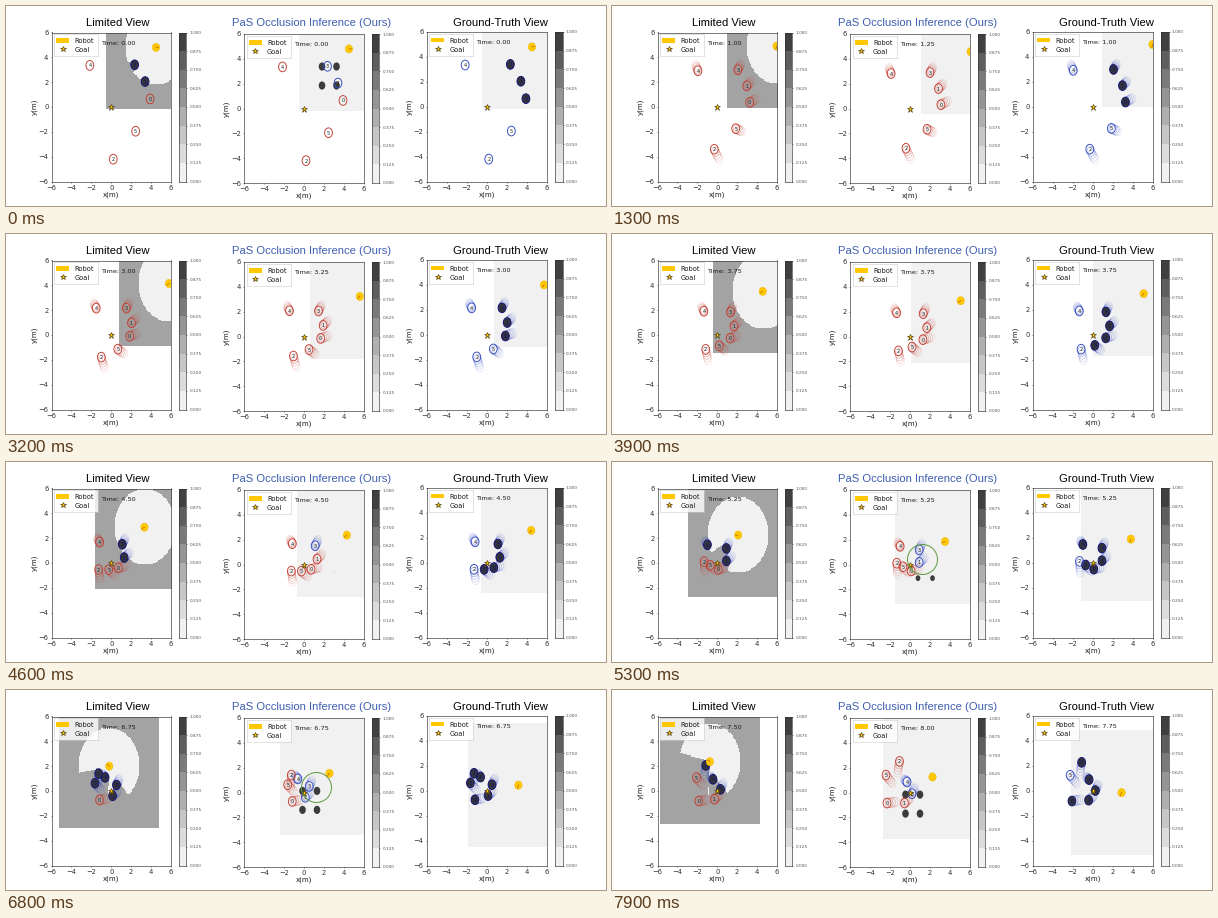
A matplotlib script for the animation above (8 s loop, 600 by 200 pixels).

```python
from itertools import product

import numpy as np
import matplotlib.pyplot as plt
from matplotlib.animation import FuncAnimation
from matplotlib.patches import Circle, Ellipse, Rectangle

W, H, DPI = 600, 200, 100
FRAMES, INTERVAL = 80, 100
PT = 72 / DPI
DT = 0.25            # simulation step
END = 8              # simulated seconds
TRAIL = 4            # past poses shown
RADIUS = 0.39        # pedestrian
RANGE = 3.05         # sensor reach
HALF = 5             # half side of the local map

RED, BLUE, NAVY = "#c23a2e", "#2f46c0", "#10107c"
GOLD, DARK, INK = "#ffc800", "#33333a", "#303030"
LIGHT, GREY = 0.945, 0.64

# Start, middle and end of each crossing.
PEDS = {
    "4": [(-2.15, 3.35), (-1.28, 1.83), (-.3, .85)],
    "3": [(2.35, 3.4), (1.25, 1.73), (.2, -.1)],
    "1": [(3.4, 2.05), (1.55, .62), (-.55, -.85)],
    "0": [(3.9, .65), (1.1, -.3), (-2.3, -.85)],
    "5": [(2.45, -1.95), (.05, -.75), (-2.4, 1.4)],
    "2": [(.2, -4.2), (-1.2, -.95), (-1.05, 2.5)],
}
ROBOT_T = [0, 1, 3, 5.25, 6.75, END]
BLOB_DX, BLOB_DY = (-2.7, -1.25), (-1.42, -2.95)

plt.rcParams.update({"font.family": "DejaVu Sans", "axes.linewidth": 0.45,
                     "text.color": "#1a1a1a", "xtick.color": INK,
                     "ytick.color": INK, "axes.edgecolor": INK})
fig = plt.figure(figsize=(W / DPI, H / DPI), dpi=DPI, facecolor="white")


def axes_px(left, top, width, height):
    return fig.add_axes([left / W, 1 - (top + height) / H, width / W, height / H])


def text_px(x, y, s, size, **kw):
    kw = {"ha": "center", "va": "center", **kw}
    return fig.text(x / W, 1 - y / H, s, fontsize=size * PT, **kw)


def crossing(points, t):
    """Parabola through three evenly timed points."""
    a, b, c = np.asarray(points)
    u = 2 * t / END - 1
    return b + u * (c - a) / 2 + u * u * ((a + c) / 2 - b)


def ped_positions(t):
    return [crossing(p, t) for p in PEDS.values()]


def blob_size(t, onset):
    """Fades out early on and grows back after the onset."""
    return np.clip(max(3 - 4 * t, (t - onset) / 1.2), 0, 1)


def polar(vec):
    return np.hypot(*vec), np.arctan2(vec[1], vec[0])


def angle_gap(a, b):
    return np.abs((a - b + np.pi) % (2 * np.pi) - np.pi)


def half_angle(dist):
    return np.arcsin(min(1, RADIUS / max(dist, RADIUS)))


def seen_by(robot, peds):
    """Which pedestrians are in reach and not hidden behind a nearer one."""
    rel = [polar(p - robot) for p in peds]
    return [d < RANGE + 0.25 and not any(
        e < d and angle_gap(a, b) < 0.55 * half_angle(e) for e, b in rel)
        for d, a in rel]


CELLS = (np.arange(100) + 0.5) / 10 - HALF
GX, GY = np.meshgrid(CELLS, CELLS)
GDIST, GANG = np.hypot(GX, GY), np.arctan2(GY, GX)


def visible_map(robot, peds):
    free = GDIST < RANGE
    for p in peds:
        d, a = polar(p - robot)
        if d < RANGE + RADIUS:
            free &= ~((angle_gap(GANG, a) < half_angle(d)) & (GDIST > d))
    return free


class Panel:
    def __init__(self, box, mode, title, start, step, last, route):
        left, top, width, height = box
        self.mode, self.start, self.step, self.last = mode, start, step, last
        self.route = np.asarray(route)

        ax = self.ax = axes_px(*box)
        ax.set(xlim=(-6, 6), ylim=(-6, 6), autoscale_on=False,
               xticks=range(-6, 7, 2), yticks=range(-6, 7, 2))
        ax.tick_params(labelsize=6.8 * PT, length=1, width=0.4, pad=1.2)
        text_px(left + width / 2, top + height + 12.8, "x(m)", 7)
        text_px(left - 17, top + height / 2, "y(m)", 7, rotation=90)
        text_px(*title[:2], title[2], 11.3, color=title[3], family="Liberation Sans")
        self.colorbar(left + width + 7.5, top, height)
        self.legend(left, top)
        self.clock = text_px(left + 49.7, top + 10.6, "", 6.5, ha="left")

        if mode == "limited":
            self.local = ax.imshow(np.zeros((100, 100)), cmap="gray", vmin=0, vmax=1,
                                   origin="lower", interpolation="nearest",
                                   aspect="auto", zorder=1)
        else:
            self.local = ax.add_patch(Rectangle((0, 0), 2 * HALF, 2 * HALF,
                                                fc=str(LIGHT), zorder=1))
        ax.plot(0, 0, "*", ms=4.6, mfc=GOLD, mec="#4a3a10", mew=0.45, zorder=7)

        self.trails = [[self.ring(0.42 - 0.09 * k, 0.5, 3) for k in range(TRAIL)]
                       for _ in PEDS]
        self.rings = [self.ring(1, 0.65, 5) for _ in PEDS]
        self.tags = [ax.text(0, 0, n, fontsize=5 * PT, ha="center",
                             va="center_baseline", zorder=6, clip_on=True)
                     for n in PEDS]
        self.blobs = [ax.add_patch(Ellipse((0, 0), 0, 0, fc="#3c3c3c", zorder=4))
                      for _ in range(4)] if mode == "inferred" else []
        self.robot = ax.add_patch(Ellipse((0, 0), 0.74, 0.66, fc=GOLD,
                                          ec="#eab000", lw=0.3, zorder=8))
        self.nose, = ax.plot([], [], color="#c07000", lw=0.6, zorder=9)

    def ring(self, alpha, lw, z):
        return self.ax.add_patch(Ellipse((0, 0), 2 * RADIUS, 2 * RADIUS,
                                         fc="none", lw=lw, alpha=alpha, zorder=z))

    def colorbar(self, x, top, height):
        bar = axes_px(x, top, 8, height)
        marks = np.arange(9) / 8
        for v in marks[:-1]:
            shade = LIGHT - 0.62 * v - 0.2 * v * v
            bar.add_patch(Rectangle((0, v), 1, 1 / 8, fc=str(shade), lw=0))
        bar.set(xlim=(0, 1), ylim=(0, 1), xticks=[], yticks=marks,
                yticklabels=[f"{v:.3f}" for v in marks])
        bar.yaxis.tick_right()
        bar.tick_params(labelsize=4.3 * PT, length=1, width=0.4, pad=1.2,
                        labelcolor="#555555")

    def legend(self, left, top):
        box = axes_px(left + 2.5, top + 1.5, 44, 22)
        box.set(xlim=(0, 44), ylim=(22, 0), xticks=[], yticks=[])
        box.patch.set_alpha(0.8)
        for side in box.spines.values():
            side.set(color="#cccccc", linewidth=0.4)
        box.add_patch(Rectangle((2.3, 4.2), 13, 4.8, fc=GOLD))
        box.plot(8.8, 15.4, "*", ms=4.4, mfc=GOLD, mec="#4a3a10", mew=0.45)
        for y, name in ((6.6, "Robot"), (15.8, "Goal")):
            box.text(20.5, y, name, fontsize=6.6 * PT, va="center_baseline")

    def robot_at(self, t):
        return np.array([np.interp(t, ROBOT_T, axis) for axis in self.route.T])

    def show_map(self, robot, peds):
        x, y = robot - HALF
        if self.mode != "limited":
            self.local.set_xy((x, y))
            return
        self.local.set_data(np.where(visible_map(robot, peds), LIGHT, GREY))
        self.local.set_extent((x, x + 2 * HALF, y, y + 2 * HALF))
        self.ax.set(xlim=(-6, 6), ylim=(-6, 6))

    def styles(self, robot, peds):
        """Edge colour and fill flag for each pedestrian."""
        if self.mode == "truth":
            return [(BLUE, np.all(np.abs(p - robot) < HALF - 0.05)) for p in peds]
        return [(BLUE if s else RED, s and self.mode == "limited")
                for s in seen_by(robot, peds)]

    def update(self, now):
        k = int(np.clip((now - self.start) / self.step + 1e-6, 0, self.last))
        t = k * DT
        self.clock.set_text(f"Time: {t:.2f}")
        robot, peds = self.robot_at(t), ped_positions(t)
        self.show_map(robot, peds)

        past = [ped_positions(t - (j + 1) * DT) for j in range(TRAIL)]
        for i, (edge, filled) in enumerate(self.styles(robot, peds)):
            for j, ghost in enumerate(self.trails[i]):
                ghost.set(center=past[j][i], edgecolor=edge, visible=j < k)
            ink = NAVY if filled else edge
            self.rings[i].set(center=peds[i], edgecolor=ink,
                              facecolor=DARK if filled else "none")
            self.tags[i].set(position=peds[i], color=ink if filled else "#222222")

        for blob, (dy, dx) in zip(self.blobs, product(BLOB_DY, BLOB_DX)):
            d = 0.66 * blob_size(t, 5.3 if dy == BLOB_DY[0] else 4.4)
            blob.set(center=robot + (dx, dy), width=d, height=d)

        self.robot.set_center(robot)
        step = self.robot_at(t + DT) - robot
        tip = robot + 0.25 * step / max(np.hypot(*step), 1e-6)
        self.nose.set_data(*zip(robot, tip))


panels = [
    Panel((45.5, 26.5, 119.5, 149), "limited",
          (112, 16.6, "Limited View", "black"), 0.06, 0.2495, 30,
          [(4.5, 4.8), (5.95, 4.9), (5.8, 4.15), (2.1, 2.25), (-.2, 2), (-1.1, 2.6)]),
    Panel((238, 28, 120, 149), "inferred",
          (305.5, 16.6, "PaS Occlusion Inference (Ours)", "#3f5fb0"), 0, 0.246, 32,
          [(4.5, 4.8), (6.1, 4.75), (5.85, 3.4), (3.5, 1.85), (2.55, 1.55), (2.25, 1.25)]),
    Panel((420.5, 26, 120.5, 149.5), "truth",
          (494.5 + 14.5 * 0, 16.6, "Ground-Truth View", "black"), 0.06, 0.2495, 31,
          [(4.5, 4.8), (5.95, 5), (5.7, 4), (3.8, 1.9), (3.15, .45), (2.8, -.3)]),
]

# Green highlight, placed in stage pixels.
overlay = axes_px(0, 0, W, H)
overlay.set(xlim=(0, W), ylim=(H, 0))
overlay.axis("off")
mark = overlay.add_patch(Circle((310.5, 97.5), 15, fc="none", ec="#5c9a3c", lw=0.7))


def draw(frame):
    now = frame * INTERVAL / 1000
    for panel in panels:
        panel.update(now)
    mark.set_visible(5 <= now < 7.3)
    return []


anim = FuncAnimation(fig, draw, frames=FRAMES, interval=INTERVAL,
                     repeat=True, repeat_delay=0, blit=False)
plt.show()
```
